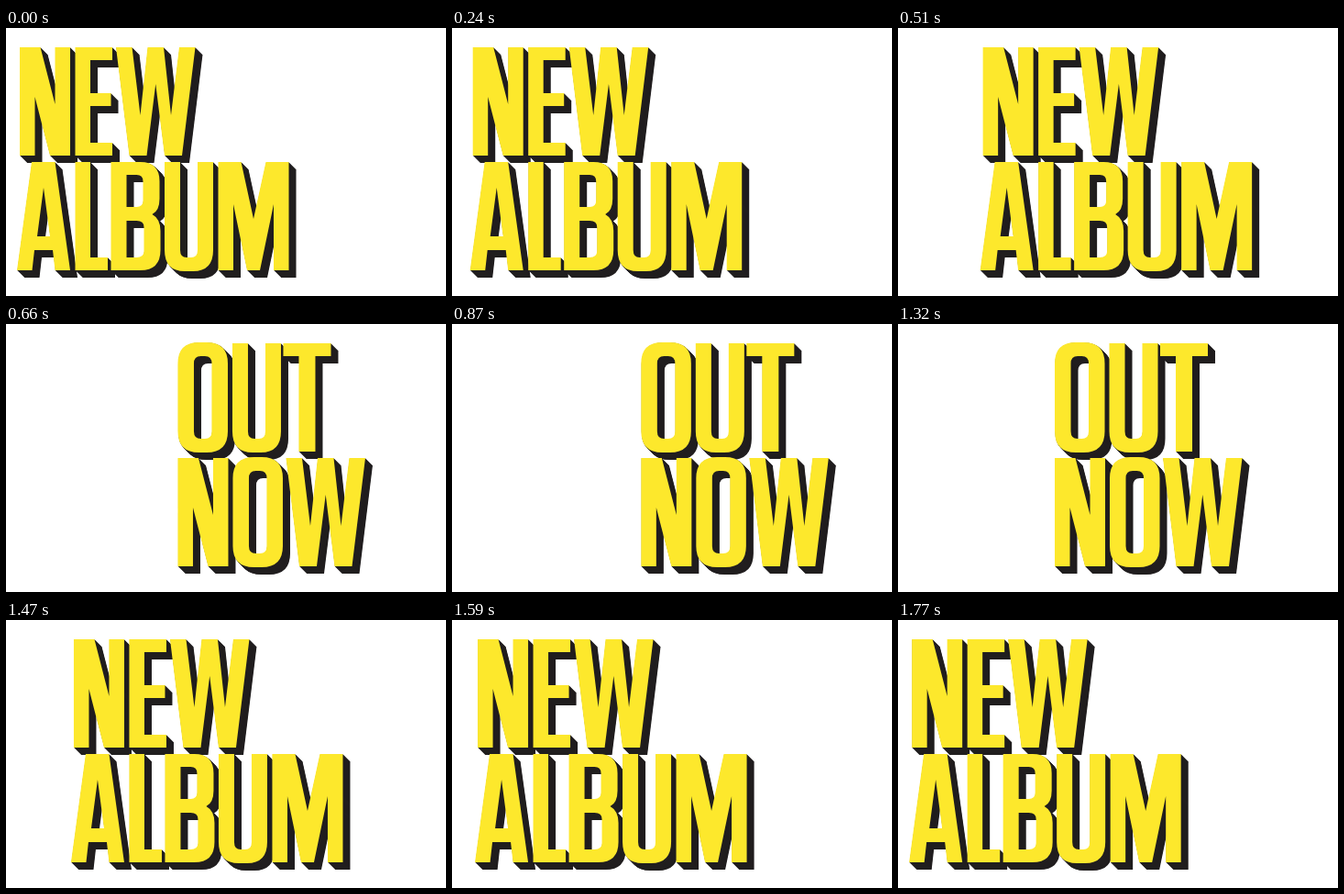
Recreate the animation shown at these times as an HTML page. Size 480 by 292 pixels, loop 1800 ms.

```html
<!DOCTYPE html>
<html lang="en">
<head>
<meta charset="utf-8">
<title>New album out now</title>
<style>
  html, body { margin: 0; width: 100%; height: 100%; overflow: hidden; background: #fff; }
  svg { display: block; width: 100vw; height: 100vh; }
</style>
</head>
<body>
<svg viewBox="0 0 480 292" role="img" aria-label="New album, out now">
  <g id="slider"></g>
</svg>
<script>
const YELLOW = '#fde82c', DARK = '#211e1f';
const LOOP = 1800, HALF = 900, STEP = 30;
const TRAVEL = 192, DEPTH = 8;

// Condensed capitals, 118 units tall
const GLYPHS = {
  A: 'M16 0H41.500L58 118H41.500L39 96H19L16.500 118H0ZM29 28L22 81H36Z',
  B: 'M0 0H32Q53 0 53 21V40Q53 53 45 57Q54 62 54 75V96Q54 118 32 118H0ZM17 14V49H28Q35 49 35 42V21Q35 14 28 14ZM17 64V104H28Q36 104 36 97V71Q36 64 28 64Z',
  E: 'M0 0H40.500V14H16.500V50H39V64H16.500V104H40.500V118H0Z',
  L: 'M0 0H16.500V104H35.500V118H0Z',
  M: 'M0 0H25L38.500 62L52 0H77V118H60.500V46L45.500 118H31.500L16.500 46V118H0Z',
  N: 'M0 0H22.500L38.500 62V0H55V118H33L16.500 54V118H0Z',
  O: 'M0 22Q0 -1 23 -1H31.500Q54.500 -1 54.500 22V96Q54.500 119 31.500 119H23Q0 119 0 96ZM17.500 22V96Q17.500 104 25 104H29.500Q37 104 37 96V22Q37 14 29.500 14H25Q17.500 14 17.500 22Z',
  T: 'M0 0H52V14H35V118H17V14H0Z',
  U: 'M0 0H17V96Q17 104 24 104H29Q36 104 36 96V0H53V96Q53 119 31 119H22Q0 119 0 96Z',
  W: 'M0 0H17.500L26.500 74L34.500 0H52L60 74L69 0H86.500L72 118H53L43.250 40L33.500 118H14.500Z'
};

const NS = 'http://www.w3.org/2000/svg';
const slider = document.getElementById('slider');

function add(parent, tag, attrs) {
  const node = parent.appendChild(document.createElementNS(NS, tag));
  for (const key in attrs) node.setAttribute(key, attrs[key]);
  return node;
}

function drawRows(parent, rows) {
  for (const { word, y, xs } of rows) {
    [...word].forEach((letter, i) => add(parent, 'path', {
      d: GLYPHS[letter],
      'fill-rule': 'evenodd',
      transform: `translate(${xs[i]} ${y})`
    }));
  }
}

// Extruded block: dark copies stepped diagonally behind the yellow face
function makeTitle(rows) {
  const title = add(slider, 'g', {});
  for (let d = DEPTH; d > 0; d -= 0.5) {
    drawRows(add(title, 'g', { fill: DARK, transform: `translate(${d} ${d})` }), rows);
  }
  drawRows(add(title, 'g', { fill: YELLOW }), rows);
  return title;
}

const newAlbum = makeTitle([
  { word: 'NEW', y: 21, xs: [15, 75.5, 120] },
  { word: 'ALBUM', y: 146, xs: [12, 75.5, 114.5, 173, 231.5] }
]);
const outNow = makeTitle([
  { word: 'OUT', y: 21, xs: [14.5, 74, 129.5] },
  { word: 'NOW', y: 146, xs: [14.5, 74.5, 132.5] }
]);

// cubic-bezier(.9, 0, .34, 1), solved by bisection
function ease(x) {
  let lo = 0, hi = 1;
  for (let i = 0; i < 30; i++) {
    const s = (lo + hi) / 2, r = 1 - s;
    const at = 3 * r * r * s * 0.9 + 3 * r * s * s * 0.34 + s * s * s;
    if (at < x) lo = s; else hi = s;
  }
  return lo * lo * (3 - 2 * lo);
}

function render(ms) {
  const t = Math.floor((ms % LOOP) / STEP) * STEP;
  const progress = t < HALF ? ease(t / HALF) : 1 - ease((t - HALF) / HALF);
  const showOut = t >= 600 && t < 1410;
  slider.setAttribute('transform', `translate(${(TRAVEL * progress).toFixed(2)} 0)`);
  newAlbum.setAttribute('display', showOut ? 'none' : 'inline');
  outNow.setAttribute('display', showOut ? 'inline' : 'none');
}

const start = performance.now();
function tick() {
  render(performance.now() - start);
  requestAnimationFrame(tick);
}
tick();
</script>
</body>
</html>
```
